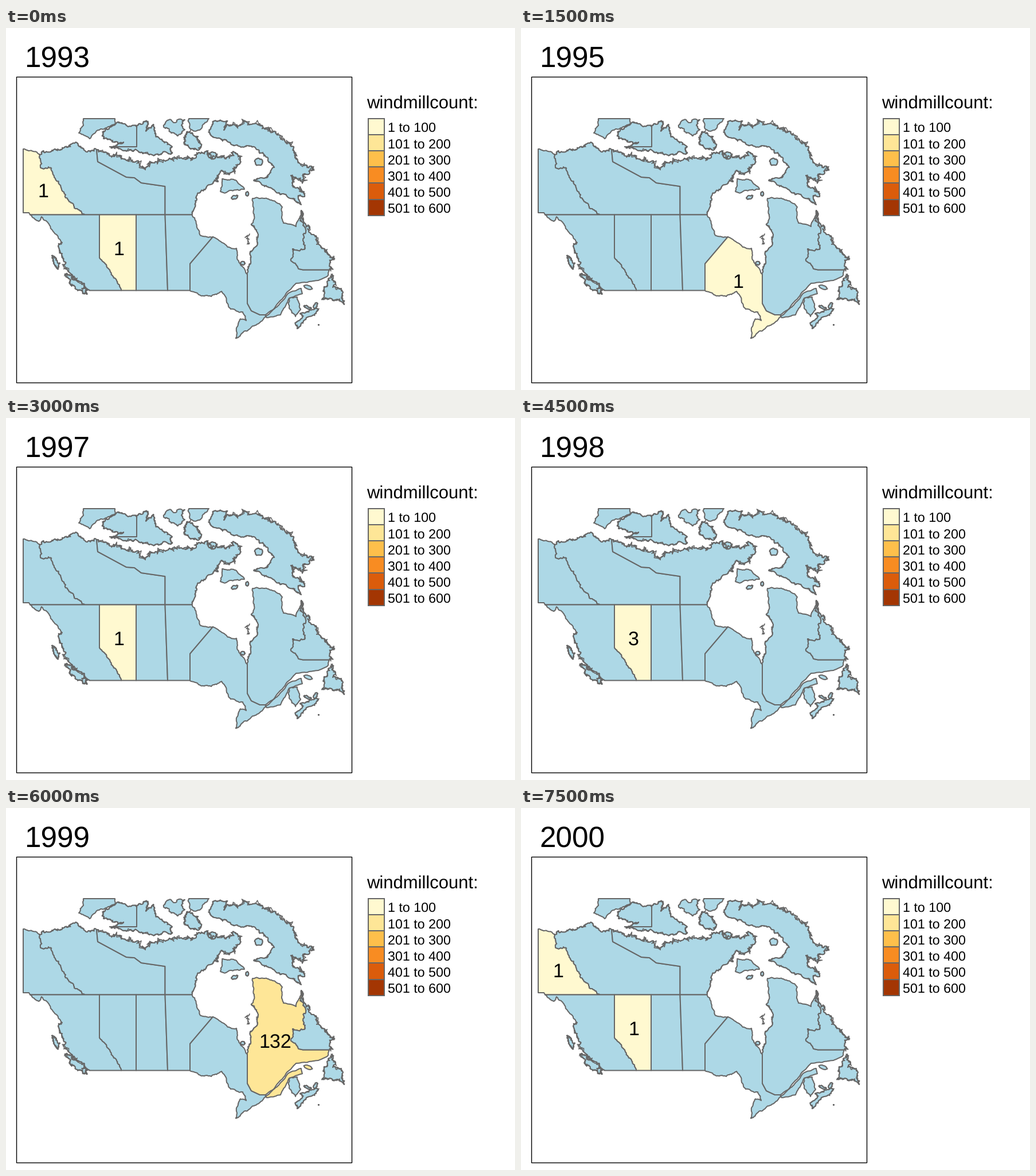
These frames come from a looping animation (888x631 px, 8000 ms). A matplotlib script:

```python
import numpy as np
import matplotlib.pyplot as plt
from matplotlib.animation import FuncAnimation
from matplotlib.patches import Polygon, Rectangle

W, H, DPI = 888, 631, 100
PX = 72 / DPI                      # points per pixel
BLUE, GREY = "#ADD8E6", "#666666"
PALETTE = ["#FFF9D0", "#FEE697", "#FEBF4B", "#F88C22", "#DB5C0B", "#A33603"]
EDGE = 2 * PX

YEARS = [
    ("1993", {"YT": 1, "AB": 1}),
    ("1995", {"ON": 1}),
    ("1997", {"AB": 1}),
    ("1998", {"AB": 3}),
    ("1999", {"QC": 132}),
    ("2000", {"YT": 1, "AB": 1}),
]
LABEL_AT = {"YT": (64.5, 284), "AB": (196.5, 385), "ON": (378.5, 442), "QC": (470, 407)}
FRAME_MS, HOLD, FRAMES = 500, 3, 16

rng = np.random.default_rng(12)


def line(*pts):
    return np.array(pts, float)


def ring(*parts):
    return np.vstack(parts)


def coast(*pts, k=0.15):
    """Roughen a polyline by midpoint displacement, with a capped swing."""
    p = line(*pts)
    for _ in range(4):
        d = np.diff(p, axis=0)
        swing = rng.uniform(-k, k, len(d)) * np.minimum(1, 12 / np.hypot(*d.T))
        mid = (p[:-1] + p[1:]) / 2 + np.c_[-d[:, 1], d[:, 0]] * swing[:, None]
        out = np.empty((2 * len(p) - 1, 2))
        out[::2], out[1::2] = p, mid
        p = out
    return p


def island(*pts, k=0.15):
    return coast(*pts, pts[0], k=k)


def blob(x, y, rx, ry, tilt=0.0, k=0.3):
    """A rough-edged ellipse."""
    a = np.linspace(0, 2 * np.pi, 9)[:-1]
    u, v = rx * np.cos(a), ry * np.sin(a)
    c, s = np.cos(tilt), np.sin(tilt)
    return island(*np.c_[x + u * c - v * s, y + u * s + v * c], k=k)


def fringe(path, spread, step=1.6):
    """A scribble of fjords and islets that swells and fades along a coast."""
    s = np.r_[0, np.cumsum(np.hypot(*np.diff(path, axis=0).T))]
    at = np.arange(0, s[-1], step)
    p = np.c_[np.interp(at, s, path[:, 0]), np.interp(at, s, path[:, 1])]
    swell = spread * np.abs(np.sin(at / 9))
    return p + rng.normal(0, 1, p.shape) * swell[:, None]


# Borders shared by two regions
yt_nt = coast((58, 220), (60, 242), (74, 242), (84, 260), (104, 296),
              (122, 315), (138, 325.5), k=0.25)
nt_nu = line((158, 212), (160, 233), (210, 260), (224, 261), (236, 270),
             (277.5, 276), (277.5, 325.5))
bc_ab = ring(line((163, 325.5), (163, 400)),
             coast((163, 400), (177, 418), (193, 440), (201, 457.5)))
sk_mb = line((277.5, 325.5), (282, 457.5))
mb_on = line((361, 364), (321, 411), (321, 457.5))
on_qc = line((421, 430), (421, 480), (428, 493), (443, 500), (453, 500))
qc_nl = ring(coast((515, 318), (513, 336), (522, 348), (519, 372), (521, 386),
                   (500, 385), (500, 408), (511, 420), k=0.3),
             line((518, 421.5), (564, 421.5)))

# Mainland coasts
yt_sea = coast((30, 211), (39, 214), (58, 220))
nt_sea = coast((58, 220), (63, 215), (82, 213), (104, 207), (116, 201),
               (130, 208), (158, 212), k=0.35)
nu_sea = coast((158, 212), (200, 226), (232, 233), (243, 245), (248, 236),
               (280, 231), (325, 230), (340, 218), (350, 214), (358, 228),
               (384, 228), (396, 215), (409, 226), (400, 250), (372, 254),
               (366, 262), k=0.35)
hudson = coast((366, 262), (370, 268), (343, 283), (331, 296), (324, 325.5), k=0.25)
mb_sea = coast((324, 325.5), (336, 352), (340, 362), (361, 364))
on_sea = coast((361, 364), (387, 382), (402, 384), (405, 405), (421, 430))
on_lakes = coast((453, 500), (441, 515), (414, 530), (401, 541), (405, 517),
                 (409, 507), (419, 510), (413, 495), (392, 490), (376, 459),
                 (358, 468), (342, 467), (321, 457.5))
qc_sea = coast((421, 430), (427, 406), (426, 390), (439, 375), (437, 354),
               (428, 343), (433, 325), (430, 297), (458, 298), (482, 312),
               (484, 340), (506, 346), (515, 318))
qc_gulf = coast((564, 421.5), (562, 431), (545, 440), (506, 445), (489, 462),
                (466, 491), (453, 500), k=0.08)
nl_sea = coast((515, 318), (537, 360), (556, 385), (572, 402), (564, 421.5), k=0.4)
bc_fjords = coast((146, 457.5), (109, 425), (95, 392), (98, 374), k=0.4)
bc_north = coast((98, 374), (88, 360), (70, 336), (62, 329), (57, 337), (42, 325.5))

gaspe = island((453, 503), (476, 483), (493, 462), (515, 454), (517, 463),
               (494, 471), (479, 500), (455, 505), k=0.08)
newfoundland = island((569, 429), (570, 452), (588, 461), (590, 482), (563, 473),
                      (551, 473), (561, 447), k=0.35)

REGIONS = {
    "YT": [ring(yt_sea, yt_nt, line((42, 325.5), (40, 322), (30, 322)))],
    "NT": [ring(nt_sea, nt_nu, yt_nt[::-1])],
    "NU": [ring(nu_sea, hudson, nt_nu[::-1])],
    "BC": [ring(bc_ab, bc_fjords, bc_north)],
    "AB": [ring(bc_ab, line((227, 457.5), (227, 325.5)))],
    "SK": [ring(line((227, 325.5)), sk_mb, line((227, 457.5)))],
    "MB": [ring(mb_sea, mb_on, sk_mb[::-1])],
    "ON": [ring(on_sea, on_qc, on_lakes, mb_on[::-1])],
    "QC": [ring(qc_sea, qc_nl, qc_gulf, on_qc[::-1]), gaspe,
           blob(527, 452, 8, 3, 0.35, k=0.1)],
    "NL": [ring(nl_sea, qc_nl[::-1]), newfoundland],
}

baffin_east = coast((387, 168), (413, 162), (440, 168), (465, 182), (497, 200),
                    (504, 226), (537, 246), (518, 268), (497, 257), (500, 272),
                    (521, 294), k=0.4)
baffin_west = coast((521, 294), (510, 292), (515, 308), (470, 285), (432, 266),
                    (455, 260), (468, 243), (452, 222), (436, 210), (398, 205),
                    (384, 195), (358, 188), (354, 178), (362, 163), (386, 162),
                    (380, 178), (387, 168), k=0.2)
banks = coast((190, 158), (190, 168), (165, 176), (146, 193), (127, 183),
              (135, 170), (135, 158))
victoria = island((170, 180), (190, 169), (228, 171), (245, 163), (244, 180),
                  (257, 168), (261, 188), (290, 207), (290, 218), (250, 221),
                  (183, 208), (205, 200), (170, 193), k=0.3)
boothia = blob(326, 197, 18, 11, 0.9, k=0.4)
vancouver = blob(124, 446, 25, 6, 0.78, k=0.4)
haida = blob(86, 408, 13, 3.5, 1.15, k=0.4)
scotia = island((513, 498), (541, 488), (545, 491), (516, 514), (509, 524),
                (505, 514), (518, 502), k=0.2)

ISLANDS = [
    ring(baffin_east, baffin_west), banks, victoria, boothia, vancouver, haida, scotia,
    island((275, 171), (284, 160), (312, 160), (306, 170), (312, 177), (300, 188),
           (288, 183), k=0.3),
    ring(line((319, 158), (354, 158)),
         coast((354, 158), (337, 178), (322, 177), (319, 158), k=0.2)),
    blob(360, 222, 8, 6),
    blob(441, 233, 7, 6),
    island((377, 263), (402, 266), (416, 281), (384, 287), (374, 285)),
    blob(399, 295, 6, 3, -0.4),
    blob(421, 289, 2.5, 4),
    blob(413, 410, 4, 3),
    island((494, 471), (508, 469), (514, 490), (505, 503), (494, 488)),
    blob(540, 484, 3, 6, 0.4),
    blob(526, 487, 7, 2, 0.3),
    blob(545.5, 517.5, 0.6, 0.4),
]

FRINGES = [
    fringe(nt_sea, 1.1), fringe(nu_sea, 2.4), fringe(hudson, 0.8),
    fringe(baffin_east, 2.6), fringe(baffin_west, 1.0), fringe(victoria, 1.3),
    fringe(boothia, 1.4), fringe(bc_fjords, 2.2), fringe(vancouver, 1.3),
    fringe(haida, 1.1), fringe(nl_sea, 2.2), fringe(newfoundland, 1.5),
    fringe(scotia, 0.9), fringe(qc_sea[:80], 1.0),
    fringe(line((425, 359), (421, 369), (425, 378)), 2.6, step=1),
]

plt.rcParams["font.family"] = "Liberation Sans"
plt.rcParams["text.hinting"] = "none"
fig = plt.figure(figsize=(W / DPI, H / DPI), dpi=DPI, facecolor="white")
ax = fig.add_axes([0, 0, 1, 1])
ax.set_xlim(0, W)
ax.set_ylim(H, 0)
ax.axis("off")


def text(x, y, s, px, **kw):
    return ax.text(x, y, s, fontsize=px * PX, va="baseline", color="black", **kw)


def land(pts):
    return ax.add_patch(Polygon(pts, closed=True, fc=BLUE, ec=GREY, lw=EDGE,
                                joinstyle="round"))


shapes = {name: [land(p) for p in parts] for name, parts in REGIONS.items()}
for pts in ISLANDS:
    land(pts)
ax.plot([228, 228, 181], [172, 206.5, 206.5], color=GREY, lw=EDGE)
for pts in FRINGES:
    ax.plot(*pts.T, color=GREY, lw=1.5 * PX, solid_joinstyle="round")

ax.add_patch(Rectangle((18, 85), 585, 533, fill=False, ec="black", lw=1.4 * PX))

text(628.9, 139.5, "windmillcount:", 31)
STEP = 28.2
for i, color in enumerate(PALETTE):
    top = 157.5 + i * STEP
    ax.add_patch(Rectangle((632.2, top), 28.2, STEP, fc=color, ec=GREY, lw=EDGE))
    text(666.2, top + 23.6, f"{100 * i + 1} to {100 * i + 100}", 23.2)

title = text(32, 68.5, "", 51.2)
counts = {name: text(x, y + 11.3, "", 34, ha="center")
          for name, (x, y) in LABEL_AT.items()}


def draw(frame):
    year, data = YEARS[frame // HOLD]
    title.set_text(year)
    for name, label in counts.items():
        n = data.get(name)
        label.set_text(str(n) if n else "")
        for shape in shapes[name]:
            shape.set_facecolor(PALETTE[(n - 1) // 100] if n else BLUE)
    return [title, *counts.values()]


anim = FuncAnimation(fig, draw, frames=FRAMES, interval=FRAME_MS,
                     repeat=True, repeat_delay=0, blit=False)
plt.show()
```
